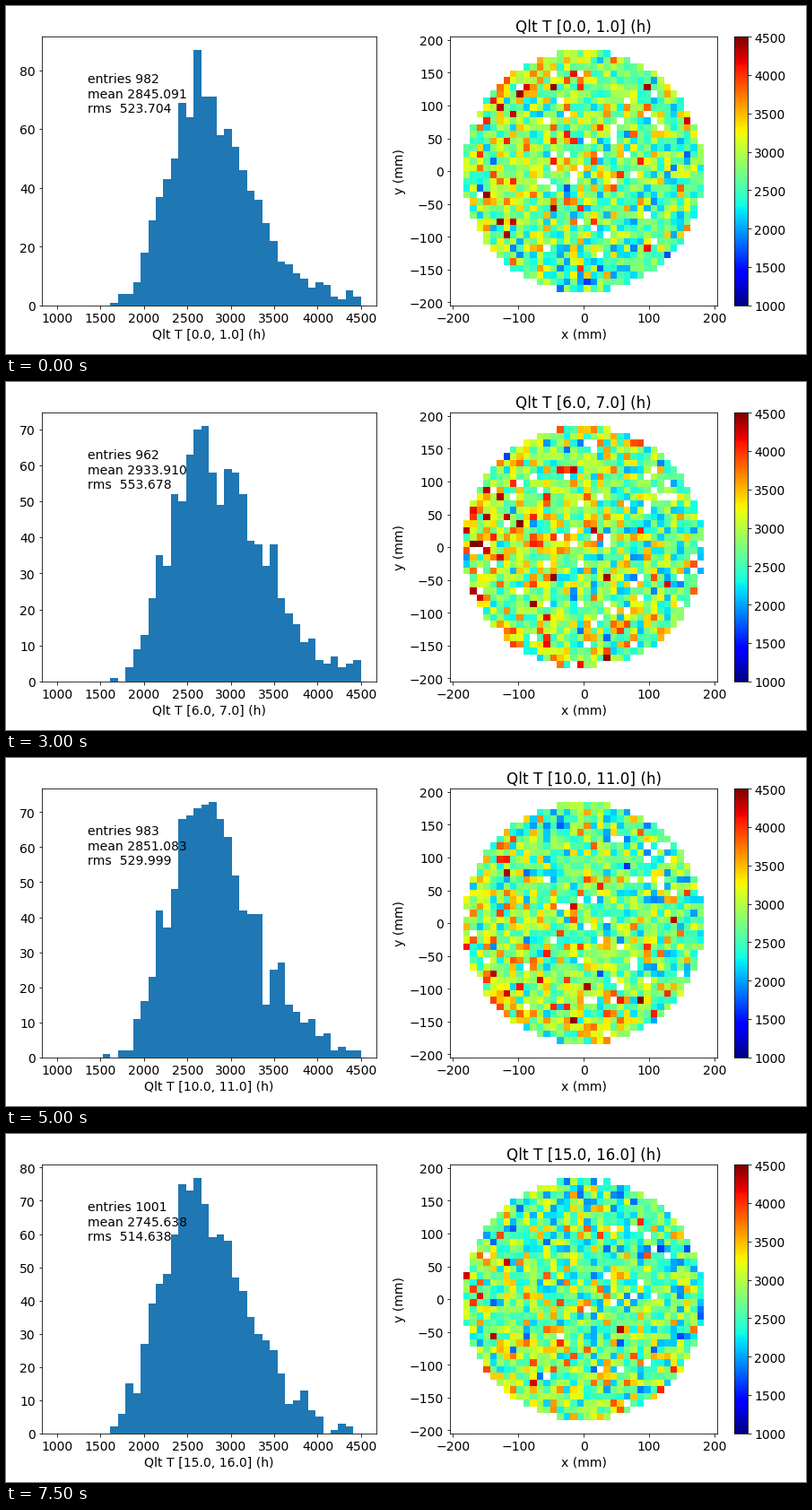
A matplotlib script that plays this animation: 892x388 px, repeating every 8 s.

```python
import matplotlib.pyplot as plt
import numpy as np
from matplotlib.animation import FuncAnimation
from matplotlib.transforms import ScaledTranslation

W, H, DPI = 892, 388, 72
HOURS = 16
LO, HI, BINS = 1000, 4500, 40
STEP = (HI - LO) / BINS
HALF, GRID, RADIUS = 204.8, 40, 18
SHAPE = 8  # of the gamma curve behind each histogram

plt.rcParams.update({"font.family": "DejaVu Sans", "font.size": 14,
                     "text.kerning_factor": 6})

# Summary at a few hours: hour, entries, mean, rms, tallest bar
KEYS = np.array([
    (0, 982, 2845.091, 523.704, 87),
    (2, 969, 2853.765, 521.167, 79),
    (6, 962, 2933.910, 553.678, 71),
    (8, 979, 2864.099, 531.621, 81),
    (10, 983, 2851.083, 529.999, 73),
    (12, 988, 2807.171, 524.053, 86),
    (15, 1001, 2745.638, 514.638, 77),
])

lows = LO + STEP * np.arange(BINS)

# Cells of the disc, in units of the cell pitch from its centre
axis = np.arange(GRID) - (GRID - 1) / 2
gx, gy = np.meshgrid(axis, axis)
disc = gx**2 + gy**2 < RADIUS**2
cx, cy = gx[disc], gy[disc]


def summary(hour):
    entries, mean, rms, peak = (np.interp(hour, KEYS[:, 0], column)
                                for column in KEYS[:, 1:].T)
    return round(entries), mean, rms, round(peak)


def histogram(entries, mean, rms, peak, rng):
    """Noisy gamma-shaped counts whose tallest bar is `peak`."""
    scale = rms / SHAPE**0.5
    z = np.maximum((lows + STEP / 2 - mean) / scale + SHAPE, 0)
    rate = z**(SHAPE - 1) * np.exp(-z)
    top = rate.argmax() + rng.integers(-2, 2)
    rate[top] = 0
    counts = rng.multinomial(entries - peak, rate / rate.sum())
    counts = np.minimum(counts, peak - 1)
    counts[top] = peak
    return counts


def blob(x, y, size):
    return np.exp(-((cx - x)**2 + (cy - y)**2) / (2 * size**2))


def disc_map(values, hour, rng):
    """Spread values over the disc, higher towards a slowly turning side."""
    chance = 0.5 + 3 * blob(11, 9.5, 2.5) + 0.7 * blob(1, -2, 5)
    lost = rng.choice(cx.size, cx.size - values.size, replace=False,
                      p=chance / chance.sum())
    kept = np.setdiff1d(np.arange(cx.size), lost)
    angle = np.radians(130 + 8 * min(hour, 12))
    tilt = (cx * np.cos(angle) + cy * np.sin(angle)) / RADIUS
    score = 0.5 * tilt + rng.normal(size=cx.size)
    cells = np.full(cx.size, np.nan)
    cells[kept[np.argsort(score[kept])]] = np.sort(values)
    grid = np.full((GRID, GRID), np.nan)
    grid[disc] = cells
    return np.ma.masked_invalid(grid)


def make_hour(hour):
    rng = np.random.default_rng(40 + hour)
    entries, mean, rms, peak = summary(hour)
    counts = histogram(entries, mean, rms, peak, rng)
    values = np.repeat(lows, counts) + STEP * rng.random(counts.sum())
    stats = f"entries {entries}\nmean {mean:.3f}\nrms  {rms:.3f}"
    return counts, stats, disc_map(values, hour, rng)


data = [make_hour(h) for h in range(HOURS)]

fig = plt.figure(figsize=(W / DPI, H / DPI), dpi=DPI, facecolor="white")
drop = ScaledTranslation(0, -0.8 / DPI, fig.dpi_scale_trans)


def add_axes(left, width, bottom=54.12, height=299.6):
    ax = fig.add_axes([left / W, bottom / H, width / W, height / H])
    ax.tick_params(axis="x", pad=4.3)
    return ax


def drop_labels(ax, base):
    """Set the labels of the y axis slightly below their ticks."""
    for label in ax.get_yticklabels():
        label.set_transform(base + drop)


hist = add_axes(39.85, 373)
bars = hist.bar(lows, np.zeros(BINS), STEP, align="edge", color="#1f77b4")
hist.set_xlim(LO - 175, HI + 175)
hist.set_xticks(range(LO, HI + 1, 500))
stats_text = hist.text(0.1365, 0.718, "", transform=hist.transAxes)

disc_ax = add_axes(494.85, 298.4)
edges = np.linspace(-HALF, HALF, GRID + 1)
mesh = disc_ax.pcolormesh(edges, edges, data[0][2], cmap="jet",
                          vmin=LO, vmax=HI)
disc_ax.set(xlim=(-HALF, HALF), ylim=(-HALF, HALF),
            xlabel="x (mm)", ylabel="y (mm)")
drop_labels(disc_ax, disc_ax.get_yaxis_text1_transform(7)[0])

scale_ax = add_axes(811.95, 15)
fig.colorbar(mesh, cax=scale_ax, ticks=range(LO, HI + 1, 500))
drop_labels(scale_ax, scale_ax.get_yaxis_text2_transform(7)[0])

hist_base = hist.get_yaxis_text1_transform(7)[0]


def draw(hour):
    counts, stats, grid = data[hour]
    for bar, n in zip(bars, counts):
        bar.set_height(n)
    hist.set_ylim(0, 1.05 * counts.max())
    drop_labels(hist, hist_base)
    stats_text.set_text(stats)
    label = f"Qlt T [{hour:.1f}, {hour + 1:.1f}] (h)"
    hist.set_xlabel(label)
    disc_ax.set_title(label, pad=5.2)
    mesh.set_array(grid)
    return []


anim = FuncAnimation(fig, draw, frames=HOURS, init_func=lambda: draw(0),
                     interval=500, repeat=True, repeat_delay=0)
plt.show()
```
